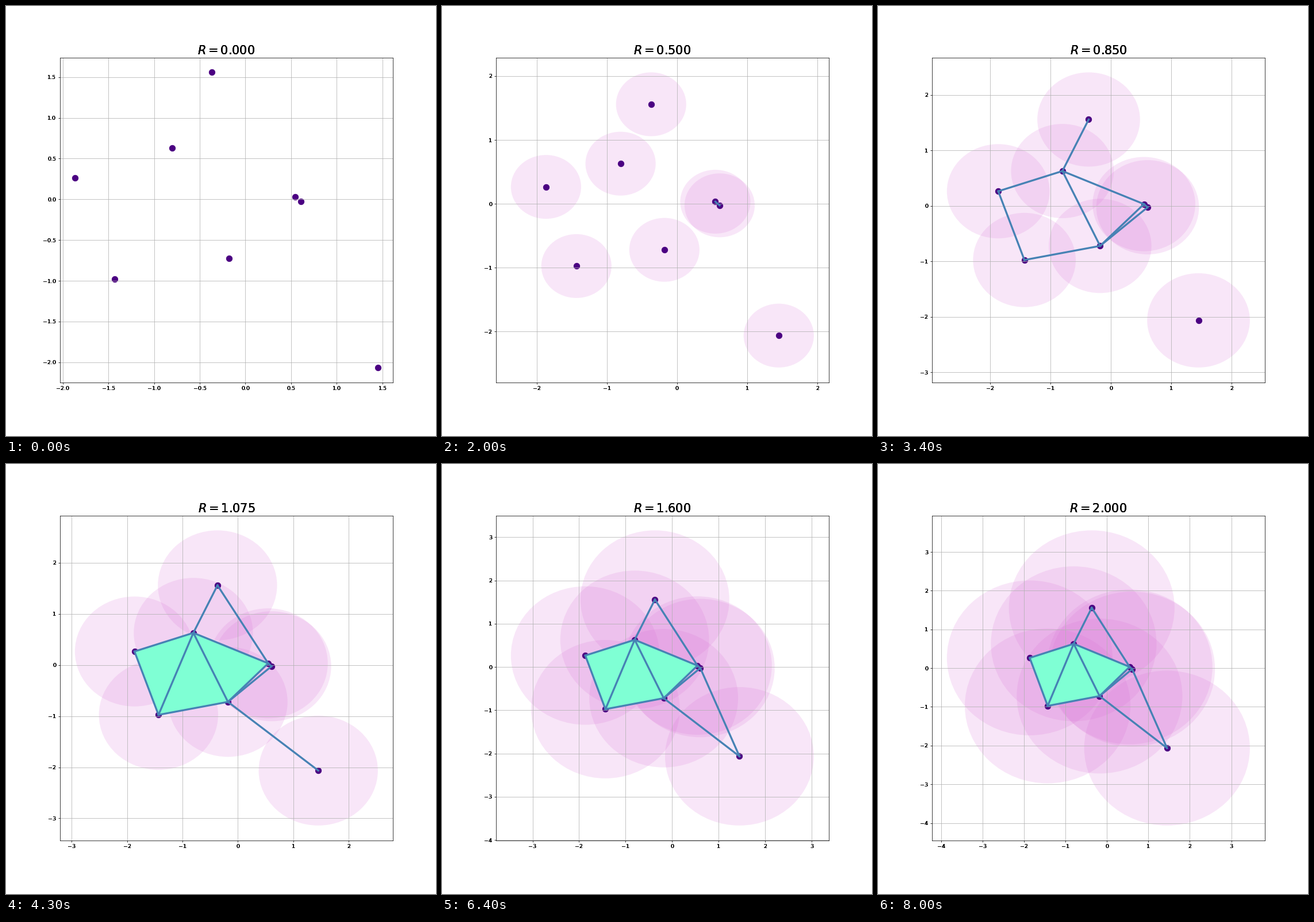
These frames come from a looping animation (748 px wide and 748 px high, 8.1 s). A matplotlib script:

```python
import matplotlib.pyplot as plt
import numpy as np
from matplotlib.animation import FuncAnimation
from matplotlib.patches import Circle
from matplotlib.text import Text

FRAMES = 81
MAX_RADIUS = 2.0

POINTS = {
    "A": (-1.866, 0.265),
    "B": (-0.804, 0.629),
    "C": (-0.369, 1.559),
    "D": (0.546, 0.033),
    "E": (0.607, -0.024),
    "F": (-0.180, -0.721),
    "G": (-1.433, -0.975),
    "H": (1.449, -2.064),
}
EDGES = "DE DF EF BC AB FG AG BD BF BG CD FH EH".split()
# Radius at which each triangle is filled
TRIANGLES = {"BDF": 0.861, "ABG": 0.862, "BFG": 0.886}

plt.rcParams.update({
    "font.family": "DejaVu Sans",
    "axes.grid": True,
    "figure.subplot.bottom": 0.125,
})
fig, ax = plt.subplots(figsize=(11, 11), dpi=68)


def corners(names):
    return np.array([POINTS[name] for name in names])


def harden(label):
    """Repaint a label over itself so its antialiased rim turns solid."""
    label.draw = lambda renderer: [Text.draw(label, renderer) for _ in range(4)]


def draw(frame):
    radius = MAX_RADIUS * frame / (FRAMES - 1)
    ax.clear()

    for point in POINTS.values():
        ax.add_patch(Circle(point, radius, facecolor="orchid",
                            edgecolor="none", alpha=0.17))
    ax.scatter(*corners(POINTS).T, s=120, color="indigo")

    for names, birth in TRIANGLES.items():
        if radius >= birth:
            ax.fill(*corners(names).T, color="aquamarine", lw=0, zorder=1.8)
    for names in EDGES:
        start, end = corners(names)
        if np.hypot(*(end - start)) <= 2 * radius:
            ax.plot(*zip(start, end), color="steelblue", lw=3.5)

    ax.autoscale_view()
    title = ax.set_title(f"$R = {radius:.3f}$", fontsize=22)
    for label in [title, *ax.get_xticklabels(), *ax.get_yticklabels()]:
        harden(label)


animation = FuncAnimation(fig, draw, frames=FRAMES, interval=100,
                          init_func=lambda: None, repeat=True)
plt.show()
```
